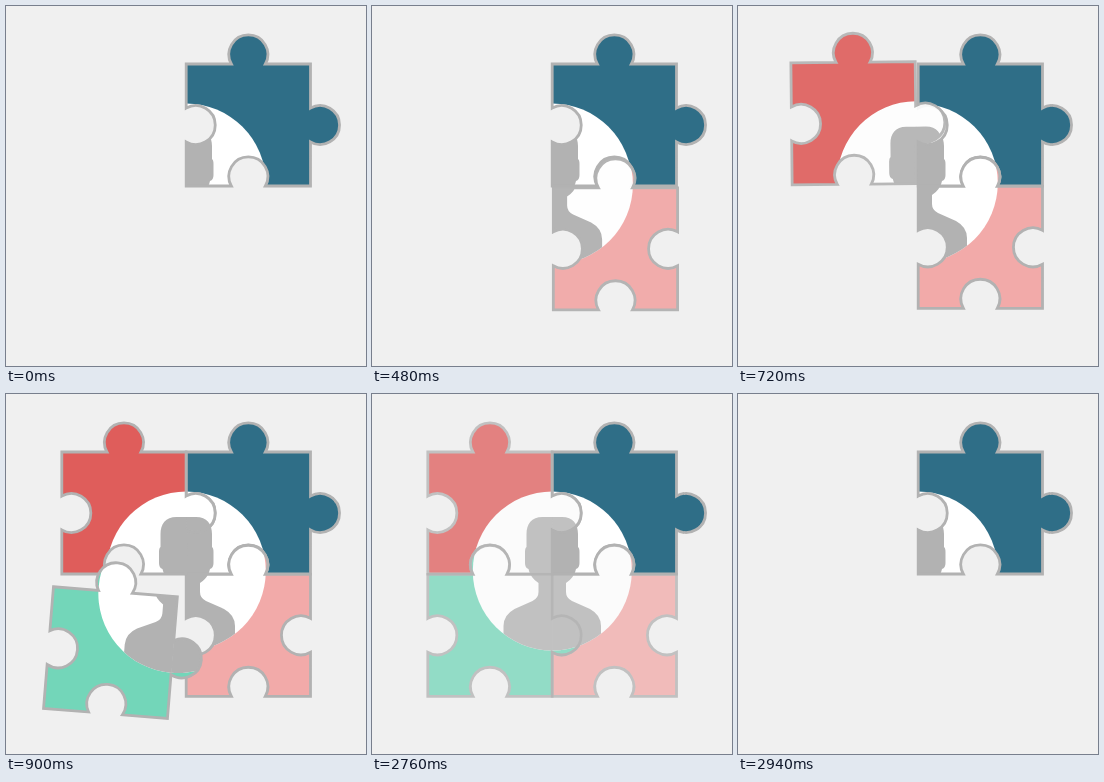
Recreate the animation shown at these times as an HTML page. Size 360 by 360 pixels, loop 3 s.

```html
<!DOCTYPE html>
<html>
<head>
<meta charset="utf-8">
<style>
  html, body { margin: 0; height: 100%; overflow: hidden; background: #f0f0f0; }
  svg { display: block; width: 100vw; height: 100vh; }
</style>
</head>
<body>
<svg id="stage" viewBox="0 0 360 360">
  <defs>
    <clipPath id="disc"><circle cx="180.3" cy="177" r="79.5"/></clipPath>
    <path id="half" d="M180 123H190C201 123 206 130 206 140V153Q207.5 154 207.5 158V169Q207.5 174 204 175Q202 184 194 189V198Q194 204 200 207L218 215Q229 221 229 232V270H180z"/>
    <g id="portrait">
      <circle cx="180.3" cy="177" r="79.5" fill="#fff"/>
      <g clip-path="url(#disc)" fill="#b2b2b2">
        <use href="#half"/>
        <use href="#half" transform="matrix(-1 0 0 1 360.5 0)"/>
      </g>
    </g>
  </defs>
</svg>
<script>
const W = 124.3, H = 122, R = 19.5, NECK = 17;
const LOOP = 3000, STEP = 60;

// sides: top, right, bottom, left; 1 = knob, 0 = socket
const pieces = [
  { x: 180.2, y: 58, color: '#2f6e87', sides: [1, 1, 0, 0] },
  { x: 180.2, y: 180.3, color: '#f2aaa9', sides: [1, 0, 0, 0],
    start: 220, end: 545, dx: 28, dy: 38, turn: 0, gain: 1 },
  { x: 55.8, y: 58, color: '#df5d5b', sides: [1, 1, 0, 0],
    start: 568, end: 790, dx: -23, dy: -17, turn: -6, gain: 1 },
  { x: 55.8, y: 180.3, color: '#73d6b9', sides: [1, 1, 0, 0],
    start: 760, end: 1132, dx: -34.7, dy: 44.5, turn: 12, gain: 1.65 }
];

function outline({ x, y, sides }) {
  const corners = [[x, y], [x + W, y], [x + W, y + H], [x, y + H]];
  let d = `M${x} ${y}`;
  sides.forEach((knob, i) => {
    const [ax, ay] = corners[i], [bx, by] = corners[(i + 1) % 4];
    const mx = (ax + bx) / 2, my = (ay + by) / 2;
    const ux = Math.sign(bx - ax) * NECK, uy = Math.sign(by - ay) * NECK;
    d += `L${mx - ux} ${my - uy}A${R} ${R} 0 1 ${knob} ${mx + ux} ${my + uy}L${bx} ${by}`;
  });
  return d + 'z';
}

const stage = document.getElementById('stage');
stage.innerHTML += pieces.map((p, i) => {
  const d = outline(p);
  return `<clipPath id="cut${i}"><path d="${d}"/></clipPath>
    <g class="piece">
      <g clip-path="url(#cut${i})"><path d="${d}" fill="${p.color}"/><use href="#portrait"/></g>
      <path d="${d}" fill="none" stroke="#b2b2b2" stroke-width="2.8"/>
    </g>`;
}).join('');
const groups = stage.querySelectorAll('.piece');

const clamp = v => Math.min(1, Math.max(0, v));

function draw(now) {
  const t = Math.floor(now % LOOP / STEP) * STEP;
  const fade = 1 - clamp((t - 2700) / 240);
  pieces.forEach((p, i) => {
    if (!p.end) return;
    const away = (1 - clamp((t - p.start) / (p.end - p.start))) ** 2;
    groups[i].setAttribute('opacity', clamp(p.gain * (1 - away)) * fade);
    groups[i].setAttribute('transform',
      `translate(${p.dx * away} ${p.dy * away}) rotate(${p.turn * away} ${p.x + W / 2} ${p.y + H / 2})`);
  });
}

let begin;
function tick(now) {
  begin ??= now;
  draw(now - begin);
  requestAnimationFrame(tick);
}
draw(0);
requestAnimationFrame(tick);
</script>
</body>
</html>
```
